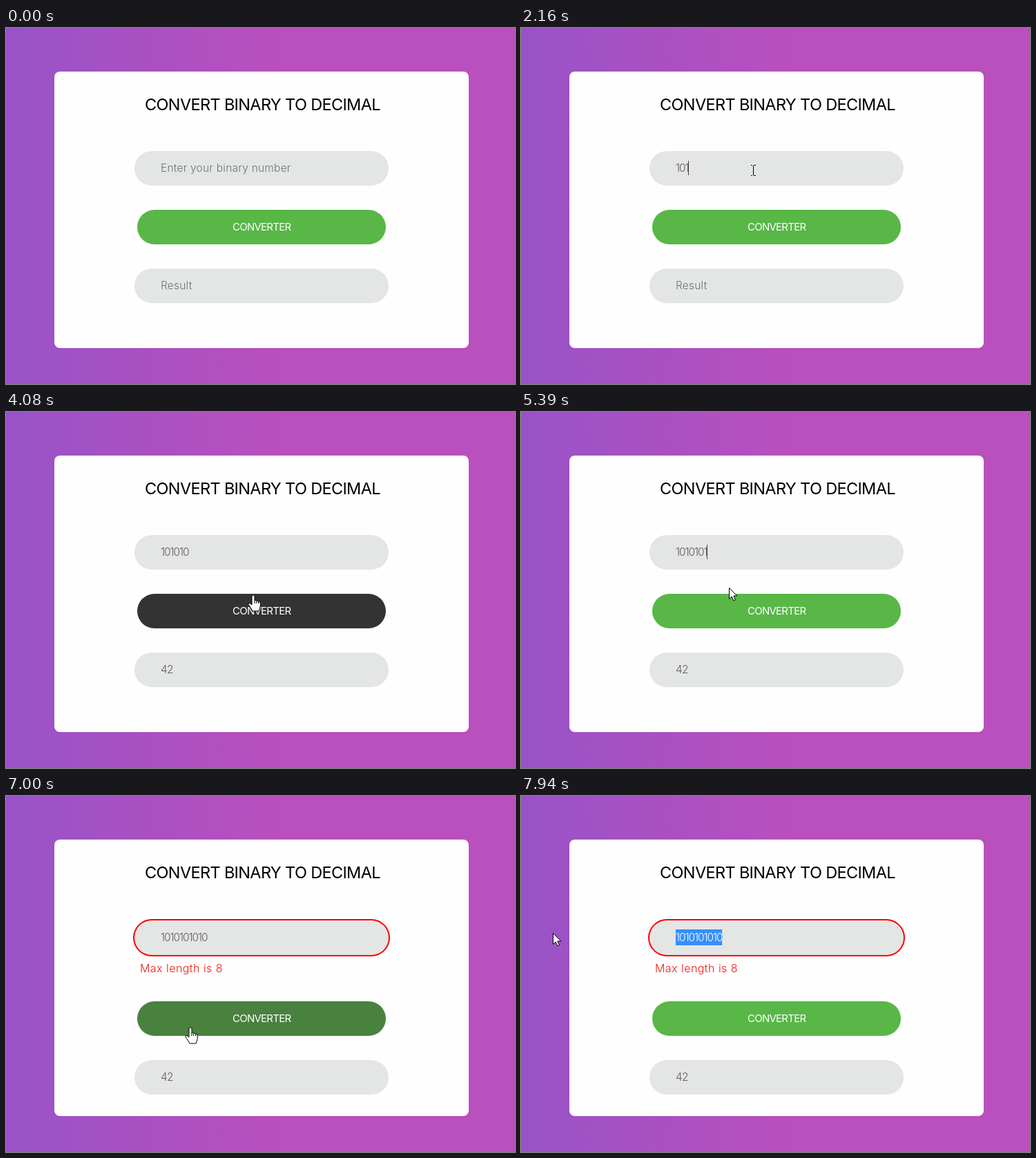
These frames come from a looping animation (737 px wide and 515 px high, 8000 ms). An HTML page with a canvas:

```html
<!DOCTYPE html>
<html lang="en">
<head>
<meta charset="utf-8">
<title>Binary to decimal</title>
<style>
  html, body { margin: 0; width: 100%; height: 100%; overflow: hidden; }
  canvas { display: block; }
</style>
</head>
<body>
<canvas id="stage" width="737" height="515"></canvas>
<script>
const ctx = document.getElementById('stage').getContext('2d');
const LOOP = 8000, LEFT = 224, STEP = 5, FADE = 170;
const RESULT_AT = 3600, ERROR_AT = 6620, DRAG_AT = 7430;
const FOCUS = [[1020, RESULT_AT], [4890, ERROR_AT]];

// Each burst types the digits "1" and "0", 100 ms apart.
const DIGITS = '10'.repeat(5);
const KEY_TIMES = [1870, 2160, 2430, 5390, 5730].flatMap(t => [t, t + 100]);

// The pointer glides along a curve: start, end, from, bend, to.
const GLIDES = [
  [90, 1040, [707, 510], [420, 15], [336, 206]],
  [2990, 3700, [336, 206], [445, 195], [372, 306]],
  [3880, 4550, [372, 306], [342, 200], [309, 190]],
  [4750, 5000, [309, 190], [305, 222], [301, 254]],
  [6270, 6500, [301, 254], [236, 269], [265, 285]],
  [6900, 7010, [265, 285], [267, 310], [268, 336]],
  [7080, DRAG_AT, [268, 336], [255, 270], [317, 205]],
  [DRAG_AT, 7940, [317, 205], [180, 206], [46, 198]]
];

const ARROW = new Path2D('M.5 .5V16.5L4.2 13L6.7 18.8L9.3 17.7L6.9 12H11.8Z');
const HAND = new Path2D('M-3 1Q-1-1.5 1 1V8Q2.5 6.5 3.7 8.5Q5.5 7.3 6.5 9.5Q9 8.8 9.3 11.5V15' +
  'Q9 19 7 23H-2Q-4 19-8 13.5Q-8.5 11-6 11.5L-3 14ZM1 8V12M3.7 8.5V12M6.5 9.5V12');
const BEAM = new Path2D('M-3 -7.5H-1M1 -7.5H4M-3 7.5H-1M1 7.5H4M.5 -7V7');

const background = ctx.createLinearGradient(0, 0, 400, 0);
background.addColorStop(0, '#9853c6');
background.addColorStop(1, '#ba4fbe');

const STYLES = {
  title: ['400 23.5px', -0.65],
  hint: ['300 15.5px', 0.22],
  digits: ['300 15.5px', -1.1],
  result: ['300 15.5px', -0.7],
  button: ['400 15px', -0.75],
  error: ['300 16px', 0.45]
};

const clamp = v => Math.max(0, Math.min(1, v));
const ease = u => u * u * (3 - 2 * u);
const shiftAt = t => t < ERROR_AT ? 0 : 34;

function pointerAt(t) {
  const glide = GLIDES.filter(g => g[0] <= t).pop();
  if (!glide) return null;
  const [start, end, from, bend, to] = glide;
  const u = ease(clamp((t - start) / (end - start))), v = 1 - u;
  return [0, 1].map(k => v * v * from[k] + 2 * u * v * bend[k] + u * u * to[k]);
}

function inside([x, y], left, top, w, h) {
  return x >= left && x < left + w && y >= top && y < top + h;
}

function overButton(t) {
  const pointer = pointerAt(t);
  return pointer && inside(pointer, 190, 263 + shiftAt(t), 360, 50);
}

// Darkness of the button over the loop: it fades in while hovered, out otherwise.
const hover = [0];
for (let t = STEP; t < LOOP; t += STEP) {
  hover.push(clamp(hover.at(-1) + (overButton(t) ? STEP : -STEP) / FADE));
}

function setStyle(name) {
  const [font, spacing] = STYLES[name];
  ctx.font = font + ' Inter, sans-serif';
  ctx.letterSpacing = spacing + 'px';
}

function text(string, x, y, style, color) {
  setStyle(style);
  ctx.fillStyle = color;
  ctx.fillText(string, x, y);
}

function box(x, y, w, h, r, fill) {
  ctx.beginPath();
  ctx.roundRect(x, y, w, h, r);
  ctx.fillStyle = fill;
  ctx.fill();
}

function drawPointer(t, pointer) {
  const onField = inside(pointer, 186, 178, 368, t < ERROR_AT ? 50 : 54);
  const shape = overButton(t) ? HAND : onField ? BEAM : ARROW;
  ctx.save();
  ctx.translate(...pointer.map(Math.round));
  ctx.strokeStyle = '#000';
  ctx.fillStyle = '#fff';
  if (shape !== BEAM) ctx.fill(shape);
  ctx.stroke(shape);
  ctx.restore();
}

function drawInput(t, pointer, baseline) {
  const keys = KEY_TIMES.filter(k => k <= t);
  const typed = DIGITS.slice(0, keys.length);
  if (typed) text(typed, LEFT, baseline, 'digits', '#5c5c5c');
  else text('Enter your binary number', LEFT, baseline, 'hint', '#6c7270');

  setStyle('digits');
  const edge = n => LEFT + ctx.measureText(typed.slice(0, n)).width;
  const end = edge(typed.length);

  const focus = FOCUS.find(([from, to]) => t >= from && t < to);
  if (focus && (t - Math.max(focus[0], ...keys)) % 1000 < 500) {
    ctx.fillStyle = '#444';
    ctx.fillRect(Math.round(end), 192, 1, 21);
  }

  if (t >= DRAG_AT) {
    let n = 0;
    while (n < typed.length && edge(n) < pointer[0]) n++;
    ctx.save();
    ctx.beginPath();
    ctx.rect(edge(n), 193, end - edge(n), 23);
    ctx.clip();
    ctx.fillStyle = '#3390ff';
    ctx.fill();
    text(typed, LEFT, baseline, 'digits', '#fff');
    ctx.restore();
  }
}

function draw(t) {
  const failed = t >= ERROR_AT;
  const shift = shiftAt(t);
  const pointer = pointerAt(t);

  ctx.fillStyle = background;
  ctx.fillRect(0, 0, 737, 515);
  box(70, 63, 600, 400, 8, '#fefefe');
  text('CONVERT BINARY TO DECIMAL', 201, 119, 'title', '#000');

  if (failed) {
    box(184, 178, 372, 54, 27, '#f00');
    text('Max length is 8', 194, 255, 'error', '#f01a10');
  }
  box(186, failed ? 180 : 178, 368, 50, 25, '#e4e6e5');
  drawInput(t, pointer, failed ? 210 : 208);

  const dark = hover[Math.floor(t / STEP)];
  const mix = [88, 183, 71].map(c => Math.round(c + (51 - c) * dark));
  box(190, 263 + shift, 360, 50, 25, `rgb(${mix})`);
  text('CONVERTER', 328, 293 + shift, 'button', '#fff');

  box(186, 348 + shift, 368, 50, 25, '#e4e6e5');
  if (t >= RESULT_AT) text('42', LEFT, 378 + shift, 'result', '#5c5c5c');
  else text('Result', LEFT, 378, 'hint', '#6c7270');

  if (pointer) drawPointer(t, pointer);
}

const begin = performance.now();
function tick() {
  draw((performance.now() - begin) % LOOP);
  requestAnimationFrame(tick);
}
tick();
</script>
</body>
</html>
```
